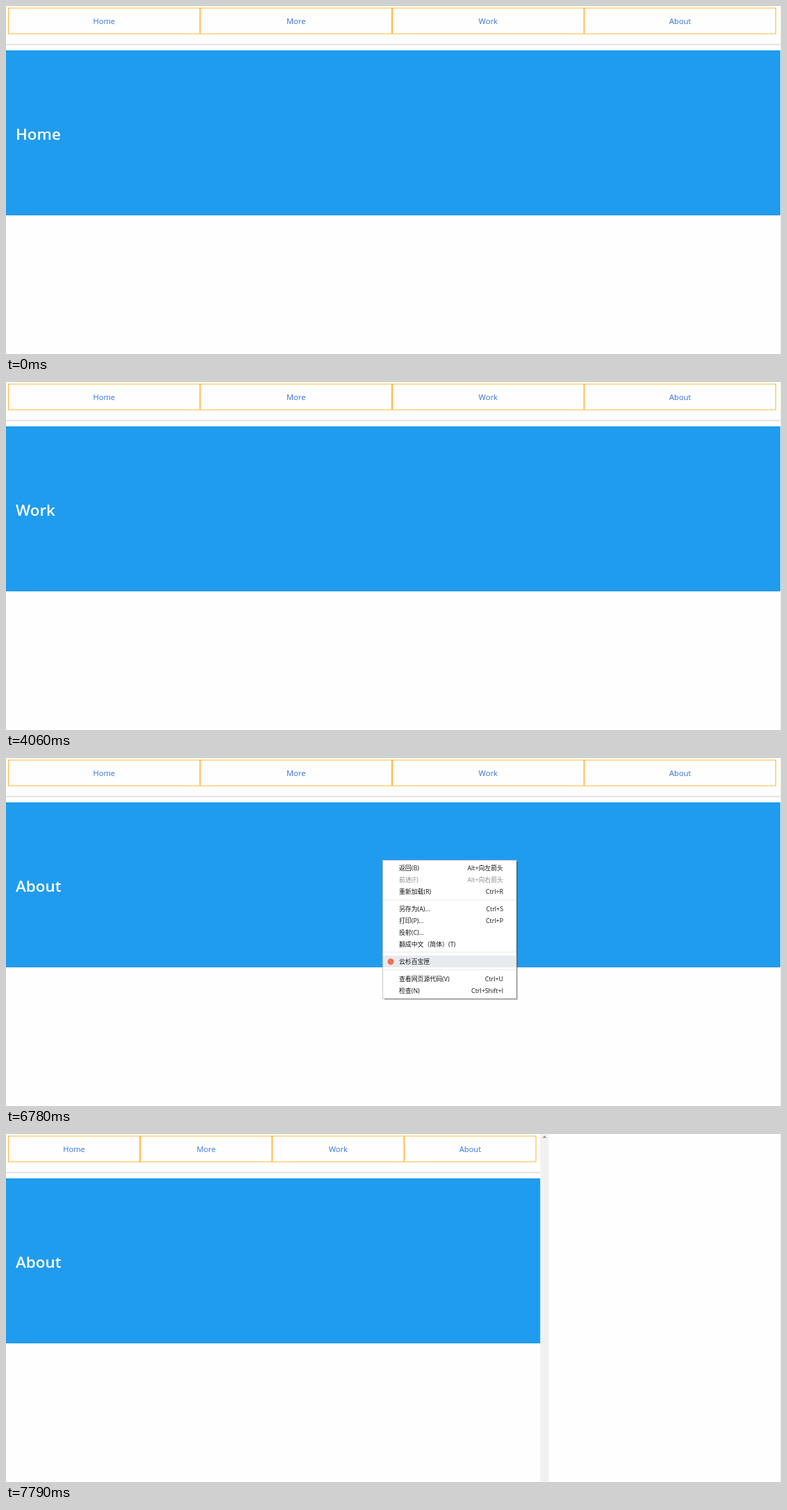
Animation, 1116 px wide and 502 px high, one loop 8000 ms. Source, as an HTML page:

```html
<!DOCTYPE html>
<html lang="zh">
<head>
<meta charset="utf-8">
<title>Tabs</title>
<style>
  html, body { margin: 0; width: 100%; height: 100%; overflow: hidden; background: #fefefe; }
  svg { display: block; }
  text { font-family: "Open Sans", "Noto Sans", "Noto Sans CJK SC", "Noto Sans CJK JP", sans-serif; }
  .link { font-size: 11.2px; text-anchor: middle; }
  .cell { fill: none; stroke: orange; stroke-width: .8; }
  .title { font-size: 22.4px; font-weight: 600; fill: #fff; }
  .menu text { font-size: 8.9px; fill: #111; }
  .menu .off { fill: #8a8a8a; }
  .keys { text-anchor: end; }
</style>
</head>
<body>
<svg id="stage" width="1116" height="502" viewBox="0 0 1116 502"></svg>
<script>
const LOOP = 8000;
const WIDE = 1115, NARROW = 769.5;
const TABS = ["Home", "More", "Work", "About"];
const HOVERS = [[1770, 2270], [2720, 3480], [3700, 4060], [5850, 6380]];
const OPENED = [0, 3170, 3920, 6020];
const MENU = { open: 6580, settle: 6920, close: 7260 };
const RESIZE = 7790;

// label, shortcut, row centre
const ITEMS = [
  ["返回(B)", "Alt+向左箭头", 159],
  ["前进(F)", "Alt+向右箭头", 176],
  ["重新加载(R)", "Ctrl+R", 193],
  ["另存为(A)...", "Ctrl+S", 218],
  ["打印(P)...", "Ctrl+P", 235],
  ["投射(C)...", "", 252],
  ["翻成中文（简体）(T)", "", 269],
  ["云杉百宝匣", "", 293.5],
  ["查看网页源代码(V)", "Ctrl+U", 319],
  ["检查(N)", "Ctrl+Shift+I", 336]
];

const stage = document.getElementById("stage");

function add(parent, tag, attrs, label) {
  const node = document.createElementNS("http://www.w3.org/2000/svg", tag);
  set(node, attrs);
  if (label) node.textContent = label;
  parent.appendChild(node);
  return node;
}

function set(node, attrs) {
  for (const key in attrs) node.setAttribute(key, attrs[key]);
}

function rect(parent, x, y, width, height, fill) {
  return add(parent, "rect", { x, y, width, height, fill });
}

function show(node, visible) {
  node.setAttribute("visibility", visible ? "visible" : "hidden");
}

rect(stage, 0, 0, 1116, 502, "#fefefe");
rect(stage, 1115, 0, 1, 502, "#ececec");
const rule = rect(stage, 0, 54.8, WIDE, 1.5, "#dbdbdb");
const hero = rect(stage, 0, 64, WIDE, 238, "#209cee");
const title = add(stage, "text", { class: "title", x: 14, y: 192.5 });
const tabs = TABS.map(name => ({
  cell: add(stage, "rect", { class: "cell", y: 3, height: 37 }),
  link: add(stage, "text", { class: "link", y: 26 }, name)
}));

const scrollbar = add(stage, "g", {});
rect(scrollbar, 769.5, 0, 12, 502, "#f1f1f1");
add(scrollbar, "path", { d: "M772.5 5.5l3-3 3 3z", fill: "#8b8b8b" });

const menu = add(stage, "g", { class: "menu" });
rect(menu, 545, 150, 191.5, 198.5, "rgba(0,0,0,.45)");
add(menu, "rect", {
  x: 542.5, y: 147.5, width: 192.5, height: 199.5, fill: "#fff", stroke: "#b8b8b8", "stroke-width": .8
});
for (const y of [204.5, 279.5, 305]) rect(menu, 543, y, 191.5, 1, "#e6e6e6");
const highlight = rect(menu, 543, 0, 191.5, 17, "#e8eaed");
ITEMS.forEach(([label, keys, y], i) => {
  const state = i === 1 ? "off" : "";
  add(menu, "text", { class: state, x: 566, y: y + 3.3 }, label);
  add(menu, "text", { class: "keys " + state, x: 716, y: y + 3.3 }, keys);
});
add(menu, "circle", { cx: 554, cy: 293.8, r: 4.5, fill: "#f0704f" });

// The pointer slows down on its way to the last row.
function pointerY(t) {
  const elapsed = Math.floor((t - MENU.open) / 40) * 40;
  const p = Math.min(1, elapsed / (MENU.settle - MENU.open));
  return 147 + 189 * (1 - Math.pow(1 - p, 1.66));
}

function drawMenu(t) {
  const open = t >= MENU.open && t < MENU.close;
  show(menu, open);
  const y = pointerY(t);
  const row = ITEMS.find(item => Math.abs(item[2] - y) <= 8.5);
  show(highlight, open && row);
  if (row) set(highlight, { y: row[2] - 8.5 });
}

function draw(t) {
  const narrow = t >= RESIZE;
  const width = narrow ? NARROW : WIDE;
  const step = (width - 9) / 4;
  set(rule, { width });
  set(hero, { width });
  show(scrollbar, narrow);
  tabs.forEach(({ cell, link }, i) => {
    const x = 3 + i * step;
    const [from, to] = HOVERS[i];
    set(cell, { x: x + .4, width: step - .8 });
    set(link, { x: x + step / 2, fill: t >= from && t < to ? "#363636" : "#3273dc" });
  });
  title.textContent = TABS[OPENED.filter(start => t >= start).length - 1];
  drawMenu(t);
}

const start = performance.now();
function tick() {
  draw((performance.now() - start) % LOOP);
  requestAnimationFrame(tick);
}
tick();
</script>
</body>
</html>
```
